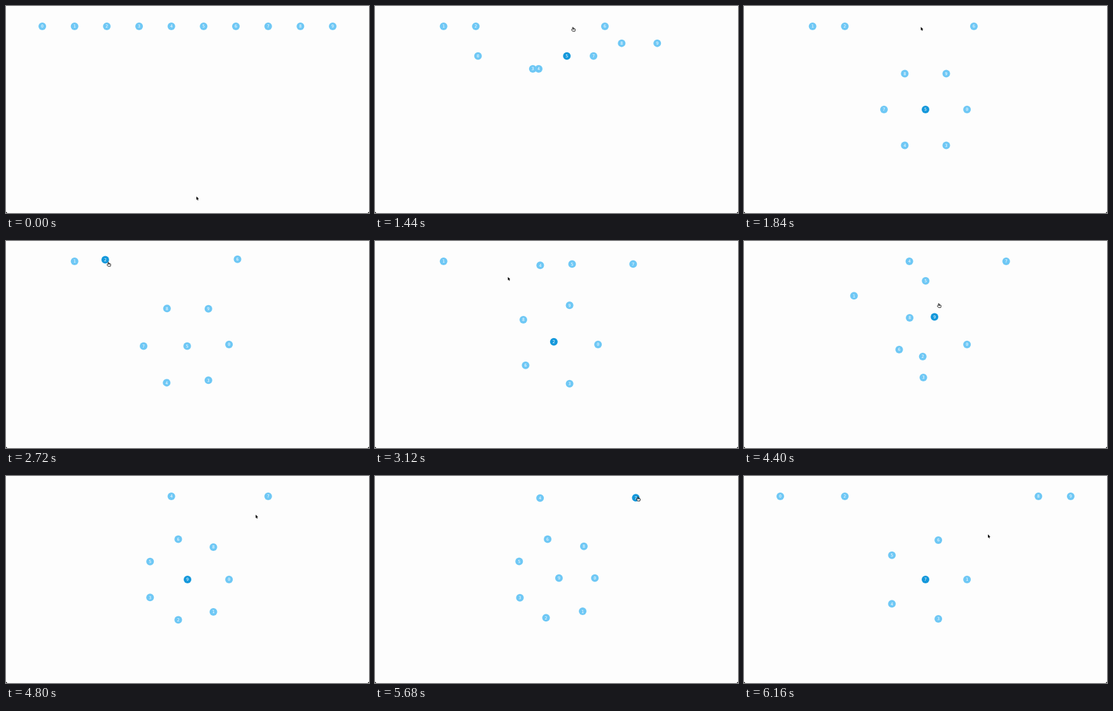
An HTML page for the animation above (6.24 s loop, 570 px wide and 326 px high).

```html
<!DOCTYPE html>
<html lang="en">
<head>
<meta charset="utf-8">
<title>Node graph</title>
<style>
  html, body { margin: 0; width: 100%; height: 100%; overflow: hidden; background: #fdfdfd; }
  svg { display: block; width: 570px; height: 326px; }
  circle { fill: #6fc8f5; }
  .active circle { fill: #1498db; }
  text { fill: #fff; font: 6.6px "DejaVu Sans Mono", "Noto Sans Mono", monospace; text-anchor: middle; }
</style>
</head>
<body>
<svg id="stage" viewBox="0 0 570 326">
  <path d="M0 324v2h2zM570 324v2h-2z"/>
  <g id="nodes"></g>
  <path id="arrow" d="M0 0V5.2L1.2 4.2L2 6.2L3 5.8L2.2 3.9L3.8 3.7Z"/>
  <path id="hand" fill="#fff" stroke="#111" stroke-width=".9" stroke-linejoin="round"
    d="M-.9 4V.9Q-.2 0 .5 .9V2.5L3 3Q3.7 3.2 3.5 4.4L3 6.8H-.7L-2.5 4.5Q-2.3 3.2 -.9 4ZM.5 2.6V4M1.8 2.9V4.1"/>
</svg>
<script>
const LOOP = 6240, STEP = 80, MOVE = 700, BACK = 1.4;
const COUNT = 10, CX = 285, CY = 163, RADIUS = 65.2;

// Each click brings one node to the middle and its neighbours around it.
const clicks = [
  { at: 1115, hub: 5, ring: [0, 3, 4, 7, 8, 9] },
  { at: 2647, hub: 2, ring: [0, 3, 6, 8, 9] },
  { at: 4087, hub: 9, ring: [0, 1, 2, 3, 5, 6, 8] },
  { at: 5463, hub: 7, ring: [1, 3, 4, 5, 6] }
];

// Pointer stops: time, x, y
const stops = [
  [160, 299, 300], [720, 311, 33], [1680, 311, 33],
  [2400, 161, 33], [2800, 161, 33],
  [3680, 292, 98], [3920, 306, 98], [4400, 306, 98],
  [4800, 392, 61], [5200, 413, 32.5], [5760, 413, 32.5],
  [6160, 383, 92]
];
const handTimes = [[640, 1680], [2320, 2800], [3840, 4400], [5120, 5760]];

const backIn = t => t * t * ((BACK + 1) * t - BACK);
const ease = u => u < .5 ? backIn(2 * u) / 2 : 1 - backIn(2 - 2 * u) / 2;
const mix = (a, b, k) => a + (b - a) * k;

function layout({ hub, ring }) {
  return Array.from({ length: COUNT }, (_, i) => {
    if (i === hub) return [CX, CY];
    const k = ring.indexOf(i);
    if (k < 0) return [57 + i * 456 / 9, 32];
    const a = 2 * Math.PI * k / ring.length;
    return [CX + RADIUS * Math.cos(a), CY + RADIUS * Math.sin(a)];
  });
}

const scenes = [{ at: -MOVE, hub: -1, ring: [] }, ...clicks];
scenes.forEach(s => s.places = layout(s));

const $ = id => document.getElementById(id);
const place = (el, x, y) => el.setAttribute("transform", `translate(${x.toFixed(2)} ${y.toFixed(2)})`);

function svg(tag, attrs, parent) {
  const el = document.createElementNS("http://www.w3.org/2000/svg", tag);
  for (const key in attrs) el.setAttribute(key, attrs[key]);
  return parent.appendChild(el);
}

const nodes = Array.from({ length: COUNT }, (_, i) => {
  const g = svg("g", {}, $("nodes"));
  svg("circle", { r: 6 }, g);
  svg("text", { y: 2.4 }, g).textContent = i;
  return g;
});

function drawNodes(t) {
  const now = scenes.findLastIndex(s => s.at <= t);
  const { at, hub, places } = scenes[now];
  const from = scenes[Math.max(0, now - 1)].places;
  const k = ease(Math.min(1, (t - at) / MOVE));
  nodes.forEach((g, i) => {
    place(g, mix(from[i][0], places[i][0], k), mix(from[i][1], places[i][1], k));
    g.setAttribute("class", i === hub ? "active" : "");
  });
}

function drawPointer(t) {
  const next = stops.findIndex(s => s[0] > t);
  const b = stops[next < 0 ? stops.length - 1 : next];
  const a = next > 0 ? stops[next - 1] : b;
  const k = a === b ? 0 : (t - a[0]) / (b[0] - a[0]);
  const x = mix(a[1], b[1], k), y = mix(a[2], b[2], k);
  const isHand = handTimes.some(([s, e]) => t >= s && t <= e);
  $("hand").style.display = isHand ? "" : "none";
  $("arrow").style.display = isHand ? "none" : "";
  place(isHand ? $("hand") : $("arrow"), x, y);
}

const start = performance.now();

function frame() {
  const t = Math.floor((performance.now() - start) % LOOP / STEP) * STEP;
  drawNodes(t);
  drawPointer(t);
  requestAnimationFrame(frame);
}
frame();
</script>
</body>
</html>
```
